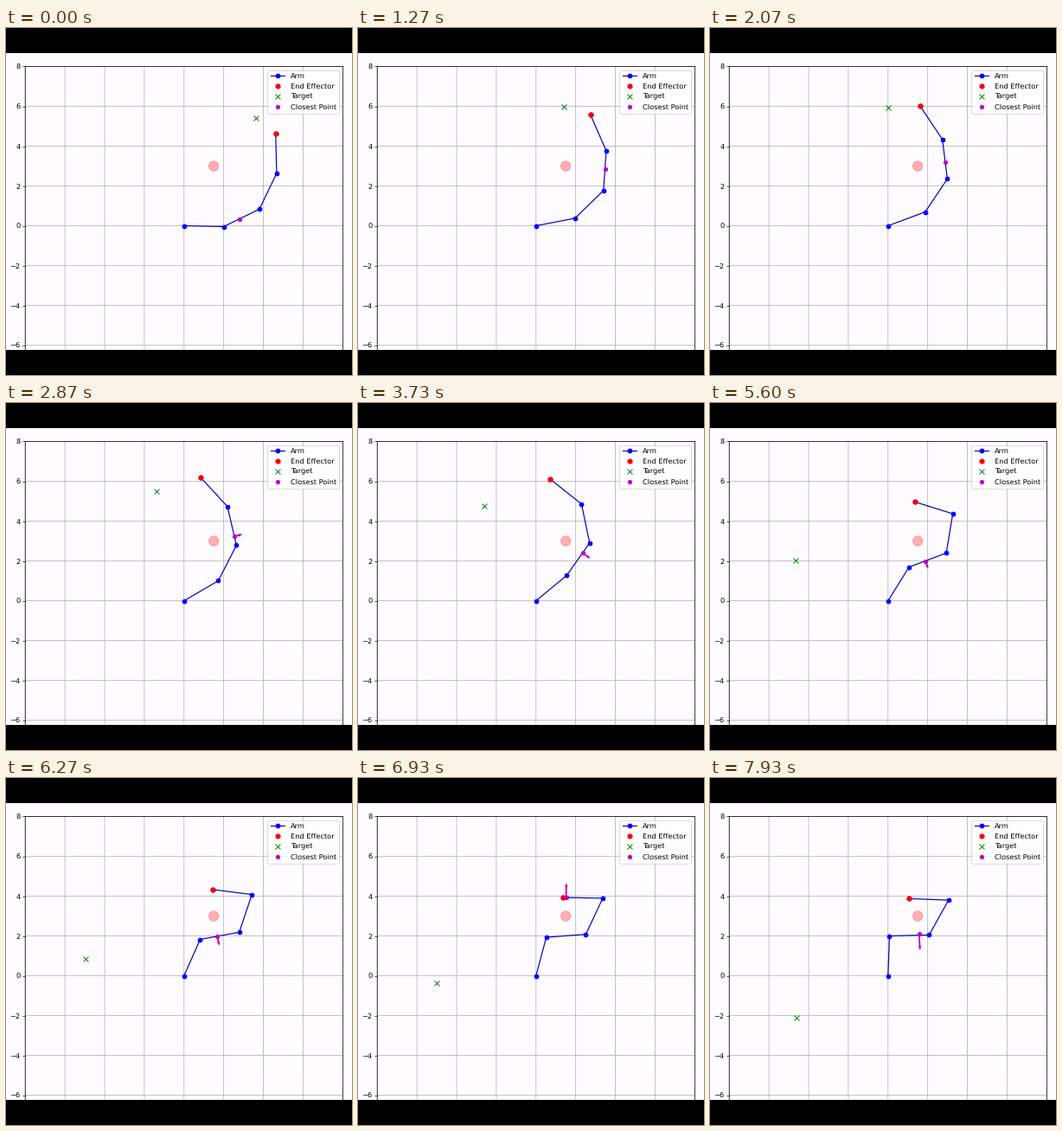
These frames come from a looping animation (400x401 px, 8 s). A matplotlib script:

```python
import numpy as np
import matplotlib.pyplot as plt
from matplotlib.animation import FuncAnimation
from matplotlib.patches import Circle, Rectangle

W, H, DPI = 400, 401, 64
FRAMES, STEP_MS = 120, 66.63   # 15 steps a second, one loop of 8 s
K = 59.25 / DPI                # scale from nominal points to this figure
BAR = 29
LINK = 2.0
OBSTACLE = np.array([1.5, 3.0])
REACH, GAIN = 2.0, 1.1         # range and strength of the repulsion
BACKGROUND = "#fefcff"

# Absolute link angles in degrees at a few moments
KEYS = np.array([0, 19, 43, 69, 84, 104, 119], float)
POSES = np.array([
    [-1.2, 26.0, 64.2, 91.5],
    [10.9, 44.2, 86.0, 113.7],
    [30.2, 62.9, 103.1, 132.8],
    [49.4, 37.3, 97.5, 151.8],
    [57.9, 20.6, 80.6, 162.7],
    [75.0, 4.4, 64.9, 179.0],
    [87.9, 3.8, 60.9, 177.8],
])


def monotone_slopes(t, y):
    """Tangents that keep the curve from overshooting its keys."""
    h = np.diff(t)[:, None]
    d = np.diff(y, axis=0) / h
    m = np.vstack([d[:1], np.zeros_like(d[1:]), d[-1:]])
    w1, w2 = 2 * h[1:] + h[:-1], h[1:] + 2 * h[:-1]
    same = d[:-1] * d[1:] > 0
    a, b = np.where(same, d[:-1], 1), np.where(same, d[1:], 1)
    m[1:-1] = np.where(same, (w1 + w2) / (w1 / a + w2 / b), 0)
    return m


SLOPES = monotone_slopes(KEYS, POSES)


def angles_at(n):
    i = min(max(np.searchsorted(KEYS, n, side="right") - 1, 0), len(KEYS) - 2)
    h = KEYS[i + 1] - KEYS[i]
    u = (n - KEYS[i]) / h
    return ((2 * u**3 - 3 * u**2 + 1) * POSES[i]
            + (u**3 - 2 * u**2 + u) * h * SLOPES[i]
            + (3 * u**2 - 2 * u**3) * POSES[i + 1]
            + (u**3 - u**2) * h * SLOPES[i + 1])


def joints(deg):
    a = np.radians(deg)
    steps = LINK * np.column_stack([np.cos(a), np.sin(a)])
    return np.vstack([[0, 0], np.cumsum(steps, axis=0)])


def nearest_on_links(pts):
    a, v = pts[:-1], np.diff(pts, axis=0)
    s = np.clip(((OBSTACLE - a) * v).sum(1) / LINK**2, 0, 1)
    near = a + s[:, None] * v
    return near, np.linalg.norm(near - OBSTACLE, axis=1)


def state(n):
    deg = angles_at(n)
    near, dist = nearest_on_links(joints(deg))
    link = int(dist.argmin())
    # Squeezed between two links, the push flips sides at each step
    if dist[3] < 1.1:
        link = 1 if n % 2 else 3
        if n % 2:
            deg[1] -= 2.3
    point, d = near[link], dist[link]
    size = GAIN * (1 / d - 1 / REACH) / d**2 if d < REACH else 0
    push = size * (point - OBSTACLE) / d
    t = 0.02 * (n + 56)
    target = np.array([1 + 6 * np.cos(t), 6 * np.sin(t)])
    return joints(deg), point, push, target


plt.rcParams.update({
    "font.family": "DejaVu Sans",
    "font.size": 10 * K,
    "text.hinting": "no_hinting",
    "axes.linewidth": 0.9 * K,
    "grid.linewidth": 0.9 * K,
    "lines.linewidth": 1.5 * K,
    "lines.markersize": 6 * K,
    "lines.markeredgewidth": 1.0 * K,
    "patch.linewidth": 1.0 * K,
    "ytick.major.size": 3.5 * K,
    "ytick.major.width": 0.8 * K,
    "ytick.major.pad": 3.5 * K,
})

fig = plt.figure(figsize=(W / DPI, H / DPI), dpi=DPI, facecolor=BACKGROUND)
ax = fig.add_axes([22.2 / W, 1 - 412.6 / H, 367.2 / W, 368.1 / H],
                  facecolor=BACKGROUND)
ax.set(xlim=(-8, 8), ylim=(-8, 8),
       xticks=range(-8, 9, 2), yticks=range(-8, 9, 2))
ax.tick_params(axis="x", length=0, labelbottom=False)
ax.grid(True)
for line in [*ax.get_xgridlines(), *ax.get_ygridlines(), *ax.spines.values()]:
    line.set_snap(False)

ax.add_patch(Circle(OBSTACLE, 0.25, color="r", alpha=0.3))
arm, = ax.plot([], [], "o-", color="#0808c0", mfc="b", mec="b", label="Arm")
effector, = ax.plot([], [], "ro", ms=6.5 * K, label="End Effector")
goal, = ax.plot([], [], "x", color="g", ms=7 * K, mew=1.2 * K, label="Target")
closest, = ax.plot([], [], "mo", ms=5.3 * K, label="Closest Point")
arrow = ax.quiver([0], [0], [0], [0], color="m", units="dots", width=1.8,
                  angles="xy", scale_units="xy", scale=1, headwidth=1.9,
                  headlength=2.5, headaxislength=2.5, zorder=3)
ax.legend(loc="upper right")

for y in (0, H - BAR):
    fig.add_artist(Rectangle((0, y / H), 1, BAR / H, facecolor="k", lw=0,
                             transform=fig.transFigure, zorder=10))


def draw(n):
    pts, point, push, target = state(n)
    arm.set_data(pts[:, 0], pts[:, 1])
    effector.set_data([pts[-1, 0]], [pts[-1, 1]])
    goal.set_data([target[0]], [target[1]])
    closest.set_data([point[0]], [point[1]])
    arrow.set_offsets([point])
    arrow.set_UVC([push[0]], [push[1]])
    return arm, effector, goal, closest, arrow


anim = FuncAnimation(fig, draw, frames=FRAMES, interval=STEP_MS,
                     repeat=True, repeat_delay=0, blit=False)
plt.show()
```
